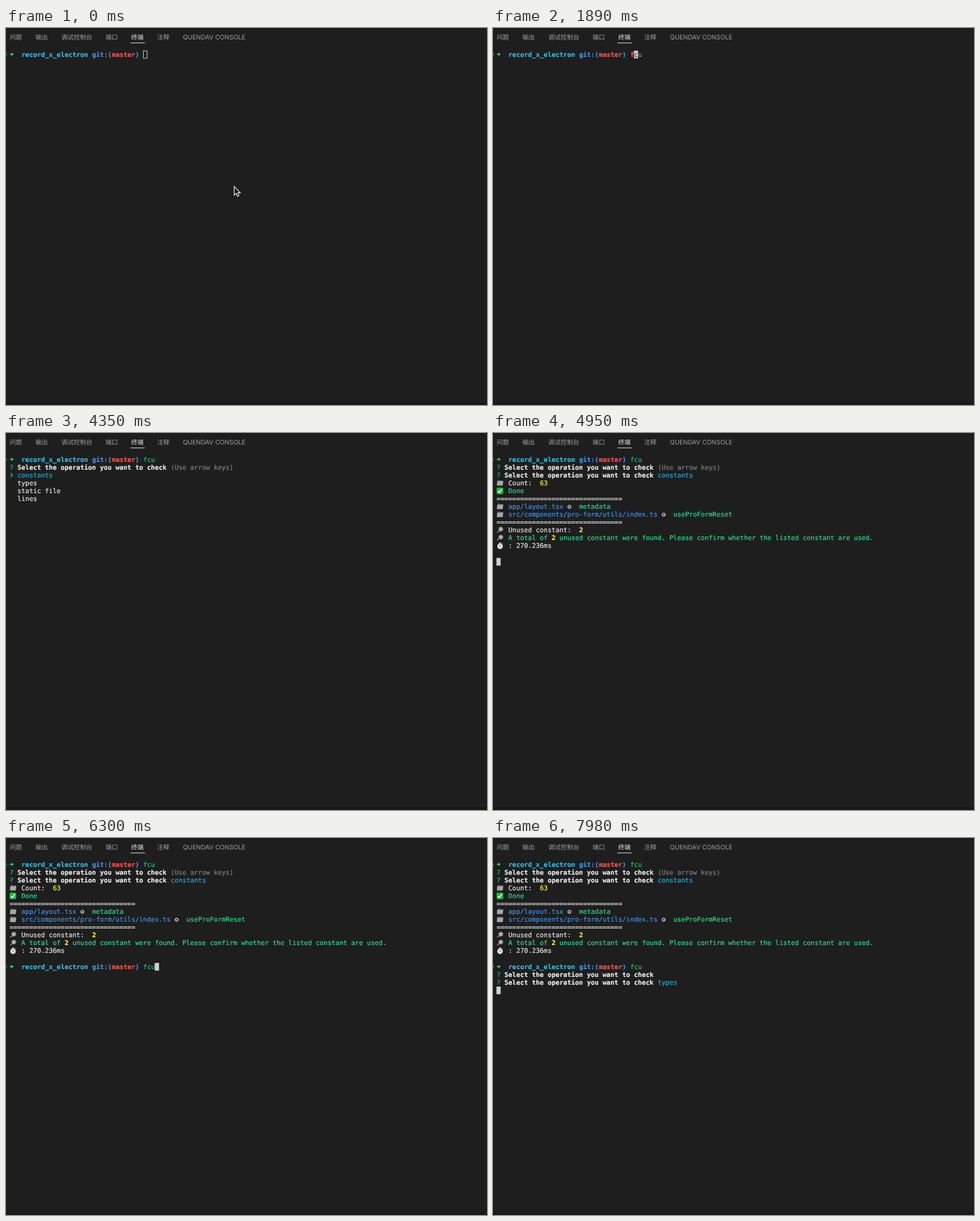
An HTML page that plays this animation: 800x627 px, repeating every 8000 ms.

```html
<!DOCTYPE html>
<html lang="zh">
<head>
<meta charset="utf-8">
<title>Terminal</title>
<style>
  html, body { margin: 0; width: 100%; height: 100%; overflow: hidden; background: #1e1e1e; }
  svg { display: block; width: 800px; height: 627px; }
  text { text-rendering: geometricPrecision; white-space: pre; }
  #tabs { font: 10.3px Inter, "Noto Sans CJK SC", "Noto Sans CJK", sans-serif; fill: #a0a0a0; }
  #tabs .active { fill: #e7e7e7; font-weight: 500; }
  #tabs .latin { font-size: 10.45px; }
  #screen { font: 10.85px "DejaVu Sans Mono", monospace; }
  #screen text { stroke-width: .2px; }
  .bold { font-weight: 700; }
</style>
</head>
<body>
<svg viewBox="0 0 800 627">
  <rect width="800" height="627" fill="#1e1e1e"/>
  <rect y="622" width="800" height="5" fill="#1b1a1b"/>
  <g id="tabs">
    <text x="6" y="18.7">问题</text>
    <text x="49" y="18.7">输出</text>
    <text x="92" y="18.7">调试控制台</text>
    <text x="165.5" y="18.7">端口</text>
    <text x="208.3" y="18.7" class="active">终端</text>
    <text x="251.3" y="18.7">注释</text>
    <text x="294.3" y="18.7" class="latin">QUENDAV CONSOLE</text>
    <rect x="207" y="24.3" width="24" height="1" fill="#e7e7e7"/>
  </g>
  <g id="screen"></g>
  <path id="mouse" d="M0 0V14.5L3.3 11.5 5.5 16.4 7.9 15.3 5.8 10.6H10.2Z" fill="#111" stroke="#fff" stroke-width="1.1"/>
</svg>
<script>
const LOOP = 8000, CELL = 6.535, LINE = 13.08, LEFT = 6, TOP = 43.8;
const C = {
  white: '#ebebeb', gray: '#838383', red: '#f9504f', blue: '#3f94f0', cyan: '#29bfe4',
  darkCyan: '#18b0d8', green: '#18c482', mint: '#27de97', yellow: '#fbfb20', block: '#d0d0d0'
};
const OPTIONS = ['constants', 'types', 'static file', 'lines'];
const QUESTION = 'Select the operation you want to check';

// Times of every key press and screen update, one entry per command run.
const RUNS = [
  { row: 0, prompt: 0, keys: [1830, 2130, 2310], enter: 2670, menu: 3600, down: Infinity, choose: 4740, output: 4920, choice: 0 },
  { row: 13, prompt: 5340, keys: [5940, 6120, 6270], enter: 6480, menu: 7080, down: 7590, choose: 7860, output: Infinity, choice: 1 }
];
const FOCUS = 1080, MOUSE_HIDE = 1800;
const MOUSE_PATH = [[0, 379, 263], [240, 379, 263], [840, 345, 195], [1260, 580, 185], [1740, 370, 212]];

const xAt = col => LEFT + col * CELL;
const yAt = row => TOP + row * LINE;

function text(row, col, string, color = C.white, bold = false) {
  return `<text x="${xAt(col)}" y="${yAt(row) + 3.75}" fill="${color}" stroke="${color}"${bold ? ' class="bold"' : ''}>${string}</text>`;
}

function cursor(row, col, hollow = false) {
  const x = xAt(col) - .3, y = yAt(row) - 6.1;
  return hollow
    ? `<rect x="${x + .6}" y="${y + .5}" width="6.2" height="12" fill="none" stroke="${C.block}"/>`
    : `<rect x="${x}" y="${y}" width="7" height="12.8" fill="${C.block}"/>`;
}

const icons = {
  folder: `<path d="M1.8-4.5H5L6-3.7H11L10 4.3H.6Z" fill="#777b7e"/><path d="M.8-2.2 11-3 10 4.3H.6Z" fill="#a4a8ab"/>`,
  done: `<rect y="-5.3" width="11" height="11" rx="2" fill="#12c03a"/><path d="M2.4.5 4.6 3 8.6-3" fill="none" stroke="#fff" stroke-width="1.7"/>`,
  search: `<path d="M.8 4 4.2 1" stroke="#777" stroke-width="2"/><circle cx="7" cy="-1.5" r="3.3" fill="#aeb4b7" stroke="#858585" stroke-width="1.2"/>`,
  watch: `<path d="M4-5H7.4M5.7-5V-3M9.2-3.8 10-3" stroke="#ccc" stroke-width="1.4"/><circle cx="5.7" cy=".7" r="4.2" fill="#eee" stroke="#bbb" stroke-width="1.2"/><path d="M5.7.9V-1.5M5.7.9H7.4" stroke="#555" fill="none"/>`,
  gear: `<g fill="none" stroke="#ddd"><circle cx="3.4" cy=".5" r="2.1" stroke-width="1.1"/><circle cx="3.4" cy=".5" r="3.1" stroke-width="1" stroke-dasharray="1.2 1.235"/></g>`,
  arrow: `<path d="M.4-.8H3.2V-3L6.5 0 3.2 3V.8H.4Z" fill="${C.mint}"/>`,
  pointer: `<path d="M1.6-3.6 4.6 0 1.6 3.6" fill="none" stroke="${C.darkCyan}" stroke-width="1.5"/>`
};
const icon = (name, row, col = 0) => `<g transform="translate(${xAt(col)} ${yAt(row)})">${icons[name]}</g>`;

function prompt(row, finished) {
  const mark = finished ? `fill="${C.blue}"` : 'fill="none" stroke="#707070"';
  return `<circle cx="-1.6" cy="${yAt(row)}" r="2.7" ${mark}/>` + icon('arrow', row) +
    text(row, 3, 'record_x_electron', C.cyan, true) + text(row, 21, 'git:(', C.blue, true) +
    text(row, 26, 'master', C.red, true) + text(row, 32, ')', C.blue, true);
}

function typing(row, count, focused) {
  const typed = 'fcu'.slice(0, count), rest = 'fcu'.slice(count), col = 34 + count;
  let out = cursor(row, col, !focused) + text(row, 34, typed, count < 3 ? C.red : C.green, count < 3);
  if (count && rest) out += text(row, col, rest[0], '#444') + text(row, col + 1, rest.slice(1), C.gray);
  return out;
}

function question(row, hint) {
  return text(row, 0, '?', C.green) + text(row, 2, QUESTION, C.white, true) +
    (hint ? text(row, 41, '(Use arrow keys)', C.gray) : '');
}

function menu(row, selected) {
  return icon('pointer', row + selected) +
    OPTIONS.map((name, i) => text(row + i, 2, name, i === selected ? C.darkCyan : C.white)).join('');
}

function report(row) {
  const rule = '='.repeat(32);
  const unused = (line, file, name) => icon('folder', line) + text(line, 3, file, C.blue) +
    icon('gear', line, file.length + 4) + text(line, file.length + 7, name, C.mint);
  return icon('folder', row) + text(row, 3, 'Count:') + text(row, 11, '63', C.yellow) +
    icon('done', row + 1) + text(row + 1, 3, 'Done', C.mint) +
    text(row + 2, 0, rule) +
    unused(row + 3, 'app/layout.tsx', 'metadata') +
    unused(row + 4, 'src/components/pro-form/utils/index.ts', 'useProFormReset') +
    text(row + 5, 0, rule) +
    icon('search', row + 6) + text(row + 6, 3, 'Unused constant:') + text(row + 6, 21, '2', C.yellow, true) +
    icon('search', row + 7) + text(row + 7, 3, 'A total of', C.mint) + text(row + 7, 14, '2', C.yellow, true) +
    text(row + 7, 16, 'unused constant were found. Please confirm whether the listed constant are used.', C.mint) +
    icon('watch', row + 8) + text(row + 8, 3, ': 270.236ms');
}

function drawRun(run, t) {
  const { row } = run;
  if (t < run.prompt) return '';
  let out = prompt(row, t >= run.output);
  if (t < run.enter) return out + typing(row, run.keys.filter(k => t >= k).length, t >= FOCUS);
  out += text(row, 34, 'fcu', C.green);
  if (t < run.menu) return out + cursor(row + 1, 0);
  out += question(row + 1, t < run.down);
  if (t < run.choose) return out + menu(row + 2, t < run.down ? 0 : run.choice);
  out += question(row + 2) + text(row + 2, 41, OPTIONS[run.choice], C.darkCyan);
  if (t < run.output) return out + cursor(row + 3, 0);
  return out + report(row + 3) + (t < RUNS[1].prompt ? cursor(row + 13, 0) : '');
}

function mousePosition(t) {
  const next = MOUSE_PATH.findIndex(p => p[0] > t);
  if (next < 0) return MOUSE_PATH.at(-1).slice(1);
  const [t0, x0, y0] = MOUSE_PATH[next - 1], [t1, x1, y1] = MOUSE_PATH[next];
  const u = (t - t0) / (t1 - t0), ease = u * u * (3 - 2 * u);
  return [x0 + (x1 - x0) * ease, y0 + (y1 - y0) * ease];
}

const screenGroup = document.getElementById('screen');
const mouse = document.getElementById('mouse');
const start = performance.now();
let shown = '';

function frame() {
  const t = (performance.now() - start) % LOOP;
  const content = RUNS.map(run => drawRun(run, t)).join('');
  if (content !== shown) screenGroup.innerHTML = shown = content;
  const [x, y] = mousePosition(t);
  mouse.setAttribute('transform', `translate(${x + .5} ${y + .5})`);
  mouse.setAttribute('visibility', t < MOUSE_HIDE ? 'visible' : 'hidden');
  requestAnimationFrame(frame);
}
frame();
</script>
</body>
</html>
```
